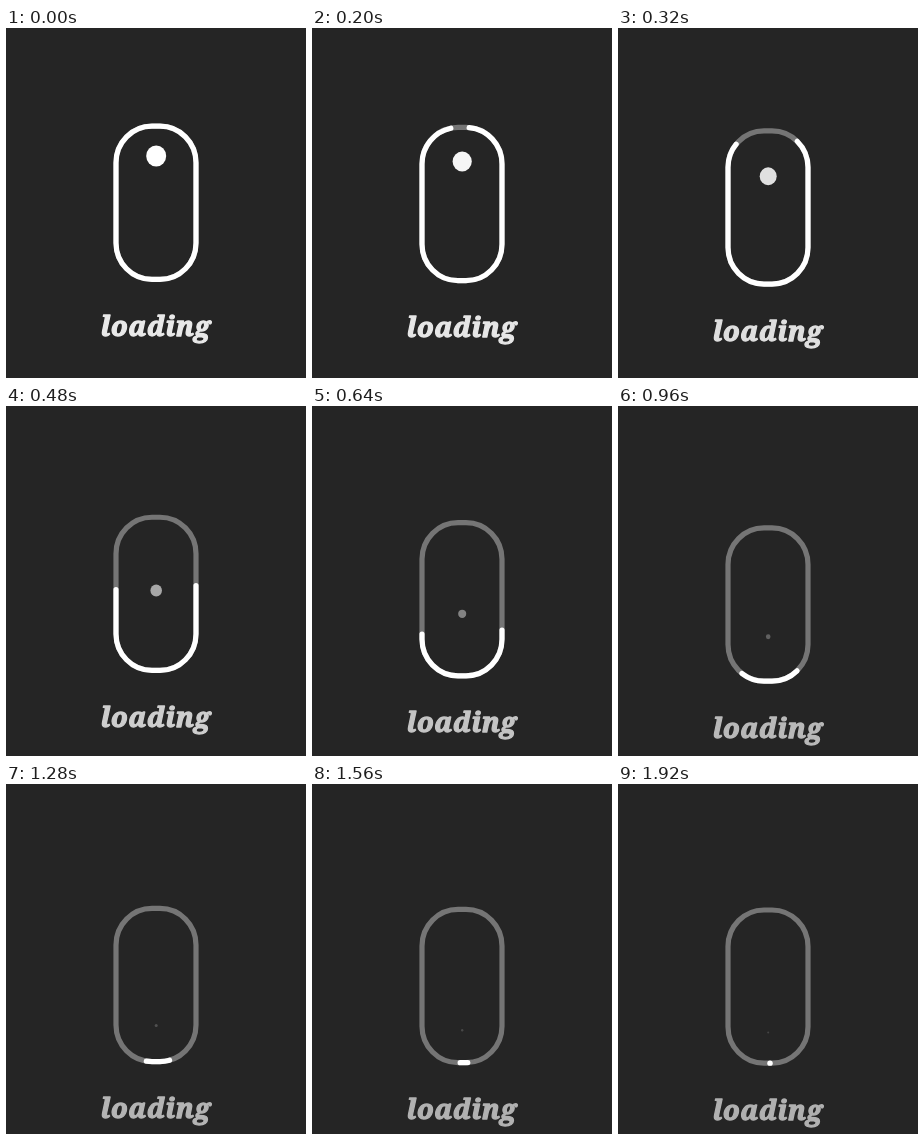
Recreate the animation shown at these times as an HTML page. Size 300 by 350 pixels, loop 2 s.

```html
<!DOCTYPE html>
<html lang="en">
<head>
<meta charset="utf-8">
<title>Loading</title>
<style>
  html, body { margin: 0; width: 100%; height: 100%; overflow: hidden; background: #252525; }
  svg { display: block; width: 300px; height: 350px; }
  .outline { fill: none; stroke: #fff; stroke-width: 5.2; }
  .track { stroke: #757575; }
  .trim { stroke-linecap: round; }
  text {
    font: italic 700 27px "Noto Serif", "Liberation Serif", serif;
    letter-spacing: .6px;
    text-anchor: middle;
    fill: #fff;
    stroke: #fff;
    stroke-width: 1.3;
    stroke-linejoin: round;
  }
</style>
</head>
<body>
<svg viewBox="0 0 300 350">
  <defs>
    <path id="body" pathLength="100" d="M148 98.2 H154 A36 36.5 0 0 1 190 134.7 V214.9
      A36 36.5 0 0 1 154 251.4 H146 A36 36.5 0 0 1 110 214.9 V134.7
      A36 36.5 0 0 1 146 98.2 Z"/>
  </defs>
  <g id="sink">
    <use href="#body" class="outline track"/>
    <use href="#body" class="outline trim" id="trim"/>
    <text id="label" x="149.8" y="308">loading</text>
  </g>
  <ellipse id="dot" cx="150.2" fill="#fff"/>
</svg>
<script>
  const LOOP = 2000, STEP = 40, LAST = 1920;
  const $ = id => document.getElementById(id);
  const sink = $("sink"), trim = $("trim"), label = $("label"), dot = $("dot");
  const mix = (a, b, p) => a + (b - a) * p;

  // cubic-bezier(.333, 0, 0, 1), solved by bisection
  function ease(x) {
    let lo = 0, hi = 1;
    for (let i = 0; i < 30; i++) {
      const s = (lo + hi) / 2;
      if (s * (1 - s) ** 2 + s ** 3 < x) lo = s; else hi = s;
    }
    return lo * lo * (3 - 2 * lo);
  }

  function draw(time) {
    const t = Math.min(Math.floor(time % LOOP / STEP) * STEP, LAST);
    const p = ease(t / LOOP);
    sink.setAttribute("transform", `translate(0 ${mix(0, 27.8, p)})`);
    // both ends of the white line run down to meet at the bottom
    trim.style.strokeDasharray = `${Math.max(100 - 100 * p, 0.01)} 200`;
    trim.style.strokeDashoffset = -50 * p;
    label.setAttribute("opacity", mix(0.9, 0.64, p));
    const r = mix(10, 1, p);
    dot.setAttribute("cy", mix(128, 248.5, p));
    dot.setAttribute("rx", r);
    dot.setAttribute("ry", r * 1.05);
    dot.setAttribute("opacity", mix(1, 0.15, p));
  }

  function tick() {
    draw(performance.now());
    requestAnimationFrame(tick);
  }
  tick();
</script>
</body>
</html>
```
